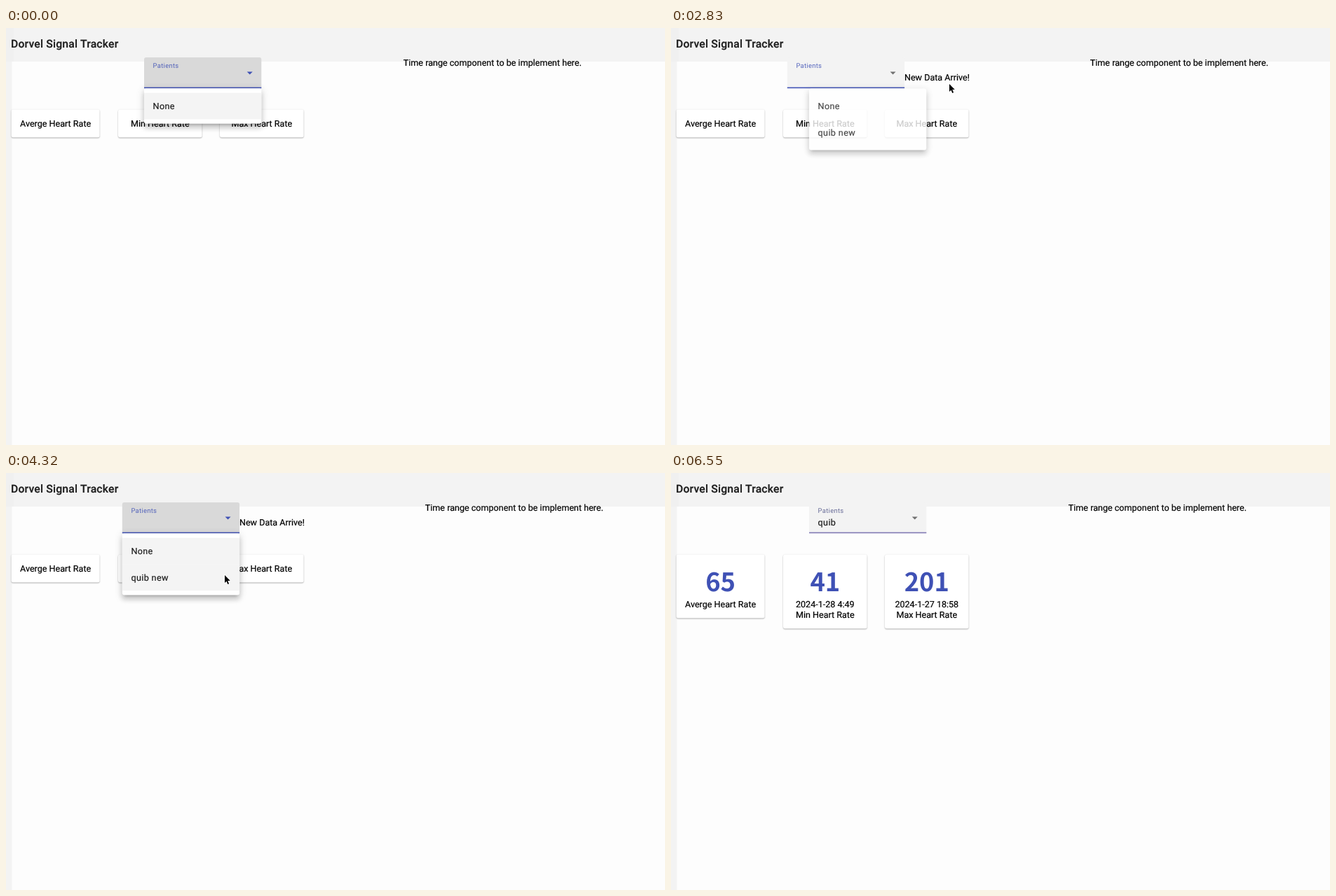
Animation of 940x596 px, one loop 6.57 s. Source, as an HTML page with a canvas:

```html
<!DOCTYPE html>
<html lang="en">
<head>
<meta charset="utf-8">
<title>Heart rate dashboard</title>
<style>
html, body { margin: 0; width: 100%; height: 100%; overflow: hidden; background: #fdfdfd; }
canvas { display: block; }
</style>
</head>
<body>
<canvas id="stage" width="940" height="596"></canvas>
<script>
const LOOP = 6570;
const STEP = 148.86;
const W = 940, H = 596;
const U = 0.786; // page zoom
const BODY = 16 * U, PAD = 16 * U, ROW = 48 * U;
const FIELD_W = 167.3;
const INDIGO = '#3f51b5';
const INK = 'rgba(0,0,0,.87)';
const SANS = 'Roboto, Arial, sans-serif';
const DIGITS = '"Noto Sans CJK JP", "Noto Sans CJK SC", "Noto Sans", sans-serif';
const USER = 'quib';

// moments of the story, in ms
const ARRIVE = 1340, CLOSE = 2830, CLOSED = 2970, HOVER = 3270, OPEN = 3720,
  OPENED = 3870, PICK = 4460, PICKED = 4610, SWITCH = 4760, LOAD = 4910, BLUR = 6550;

const stage = document.getElementById('stage').getContext('2d');
const layer = document.createElement('canvas');
layer.width = W;
layer.height = H;
const panel = layer.getContext('2d');

// places where the pointer rests or turns
const STOPS = [
  { t: 1490, x: 876, y: 237 },
  { t: 1790, x: 536, y: 181 },
  { t: 2090, x: 530, y: 176 },
  { t: CLOSE, x: 397, y: 80 },
  { t: HOVER, x: 326, y: 68 },
  { t: OPEN, x: 320, y: 91 },
  { t: 4320, x: 312, y: 146 },
  { t: SWITCH, x: 312, y: 146 },
  { t: 5210, x: 933, y: 551 },
  { t: 5810, x: 920, y: 610 }
];

const within = (t, a, b) => t >= a && t < b;
const mix = (a, b, k) => a + (b - a) * k;
const ease = k => k * k * (3 - 2 * k);

function text(c, str, x, y, { weight = 400, size = BODY, family = SANS,
  track = 0, align = 'left', color = '#000', bold = .2 } = {}) {
  c.font = `${weight} ${size}px ${family}`;
  c.textRendering = 'geometricPrecision';
  c.letterSpacing = `${track}px`;
  c.textAlign = align;
  c.fillStyle = c.strokeStyle = color;
  c.lineWidth = bold;
  c.fillText(str, x, y);
  if (bold) c.strokeText(str, x, y);
}

function rect(c, x, y, w, h, color) {
  c.fillStyle = color;
  c.fillRect(x, y, w, h);
}

function round(c, x, y, w, h, r, color) {
  c.fillStyle = color;
  c.beginPath();
  c.roundRect(x, y, w, h, r);
  c.fill();
}

// The casting shape stays off stage so that only its shadow shows
function shadow(c, x, y, w, h, dy, blur, spread, alpha) {
  const far = 3000;
  c.save();
  c.shadowColor = `rgba(0,0,0,${alpha})`;
  c.shadowBlur = blur;
  c.shadowOffsetX = far;
  c.shadowOffsetY = dy;
  round(c, x - spread - far, y - spread, w + 2 * spread, h + 2 * spread, 3, '#000');
  c.restore();
}

// White paper raised by z: umbra, penumbra and ambient light
function sheet(c, x, y, w, h, z) {
  shadow(c, x, y, w, h, .6 * z, .6 * z, -.4 * z, .2);
  shadow(c, x, y, w, h, z, 1.25 * z, .1 * z, .14);
  shadow(c, x, y, w, h, .4 * z, 1.75 * z, .25 * z, .12);
  round(c, x, y, w, h, 3, '#fff');
}

function drawPage(shifted) {
  rect(stage, 0, 0, W, H, '#fdfdfd');
  rect(stage, 0, 48, 8.5, H, '#f3f3f3');
  rect(stage, 0, 0, W, 48, '#f3f3f3');
  rect(stage, 0, 0, 11, 48, '#f0f0f0');
  text(stage, 'Dorvel Signal Tracker', 7, 28,
    { weight: 500, size: 20 * U, track: .2, color: INK });
  text(stage, 'Time range component to be implement here.', shifted ? 597.8 : 566.8, 54);
  if (shifted) text(stage, 'New Data Arrive!', 333, 75);
}

function drawCard(x, w, loaded, name, value, date) {
  const mid = x + w / 2;
  const extra = loaded ? (date ? 66 : 51) : 0;
  sheet(stage, x, 116.5, w, 40 + extra, 1.2);
  text(stage, name, mid, 140.7 + extra, { align: 'center' });
  if (!loaded) return;
  text(stage, value, mid, 169.3,
    { align: 'center', weight: 700, size: 36.3, color: INDIGO, family: DIGITS, bold: 0 });
  if (date) text(stage, date, mid, 191.7, { align: 'center' });
}

function drawCards(loaded) {
  drawCard(7.6, 126, loaded, 'Averge Heart Rate', '65');
  drawCard(160, 119.6, loaded, 'Min Heart Rate', '41', '2024-1-28 4:49');
  drawCard(305, 119.6, loaded, 'Max Heart Rate', '201', '2024-1-27 18:58');
}

function drawField(t, x) {
  const focused = t < CLOSE || within(t, OPEN, BLUR);
  const resting = within(t, CLOSED, OPEN);
  const opening = within(t, OPEN, OPENED);
  const fading = t >= BLUR;

  round(stage, x, 42, FIELD_W, 44, [3, 3, 0, 0], focused ? '#d9d9d9' : '#f3f3f3');

  const lift = resting ? 0 : opening ? .68 : 1;
  const size = BODY * (1 - .25 * lift);
  text(stage, 'Patients', x + PAD, 68.5 - 11.2 * lift, {
    size, track: size / 32, bold: 0,
    color: resting ? 'rgba(0,0,0,.6)' : fading ? '#686c98' : 'rgba(63,81,181,.87)'
  });

  const value = t >= SWITCH ? USER : t >= PICK ? USER + ' new' : '';
  text(stage, value, x + PAD, 75, { track: .39, color: INK });

  const tip = x + 150.75;
  stage.fillStyle = focused ? INDIGO : 'rgba(0,0,0,.54)';
  stage.beginPath();
  stage.moveTo(tip - 4, 62.5);
  stage.lineTo(tip + 4, 62.5);
  stage.lineTo(tip, 66.5);
  stage.fill();

  if (resting || opening) {
    rect(stage, x, 85.2, FIELD_W, .8, t < HOVER ? 'rgba(0,0,0,.42)' : INK);
  }
  if (!resting) {
    const span = opening ? 92 : FIELD_W;
    rect(stage, x + (FIELD_W - span) / 2, 84.6, span, 1.6, fading ? '#8079b3' : INDIGO);
  }
}

function drawMenu(t) {
  if (within(t, CLOSED, OPEN) || t >= PICKED) return;
  const opening = within(t, OPEN, OPENED);
  const alpha = within(t, CLOSE, CLOSED) ? .8 : opening ? .86 : t >= PICK ? .5 : 1;
  const scale = opening ? .977 : 1;
  const x = t < CLOSED ? 197 : 165.8;
  const top = 86.4, pad = PAD / 2;
  const items = t < ARRIVE ? ['None'] : ['None', USER + ' new'];
  const lit = [t < ARRIVE || t >= OPEN, t >= 4020];

  panel.setTransform(1, 0, 0, 1, 0, 0);
  panel.clearRect(0, 0, W, H);
  panel.setTransform(1, 0, 0, scale, 0, top * (1 - scale));
  sheet(panel, x, top, FIELD_W, items.length * ROW + 2 * pad, 8 * U);
  items.forEach((item, i) => {
    const y = top + pad + i * ROW;
    if (lit[i]) rect(panel, x, y, FIELD_W, ROW, '#f4f4f4');
    text(panel, item, x + PAD, y + 23.4, { track: .39, color: INK });
  });

  stage.globalAlpha = alpha;
  stage.drawImage(layer, 0, 0);
  stage.globalAlpha = 1;
}

function drawPointer(t) {
  const now = Math.round(Math.floor((t + 8) / STEP) * STEP / 10) * 10;
  const next = STOPS.findIndex(s => s.t > now);
  if (next < 1) return;
  const a = STOPS[next - 1], b = STOPS[next];
  const k = ease((now - a.t) / (b.t - a.t));

  stage.save();
  stage.translate(mix(a.x, b.x, k), mix(a.y, b.y, k));
  const arrow = new Path2D('M0 0V11L2.5 8.7L4.3 13L6.1 12.2L4.3 8.1L7.8 8Z');
  stage.lineWidth = 1.4;
  stage.strokeStyle = '#fff';
  stage.stroke(arrow);
  stage.fillStyle = '#000';
  stage.fill(arrow);
  stage.restore();
}

function draw(t) {
  const shifted = within(t, ARRIVE, SWITCH);
  drawPage(shifted);
  drawCards(t >= LOAD);
  drawField(t, shifted ? 165.8 : 197);
  drawMenu(t);
  drawPointer(t);
}

const start = performance.now();
function tick() {
  draw((performance.now() - start) % LOOP);
  requestAnimationFrame(tick);
}
tick();
</script>
</body>
</html>
```
